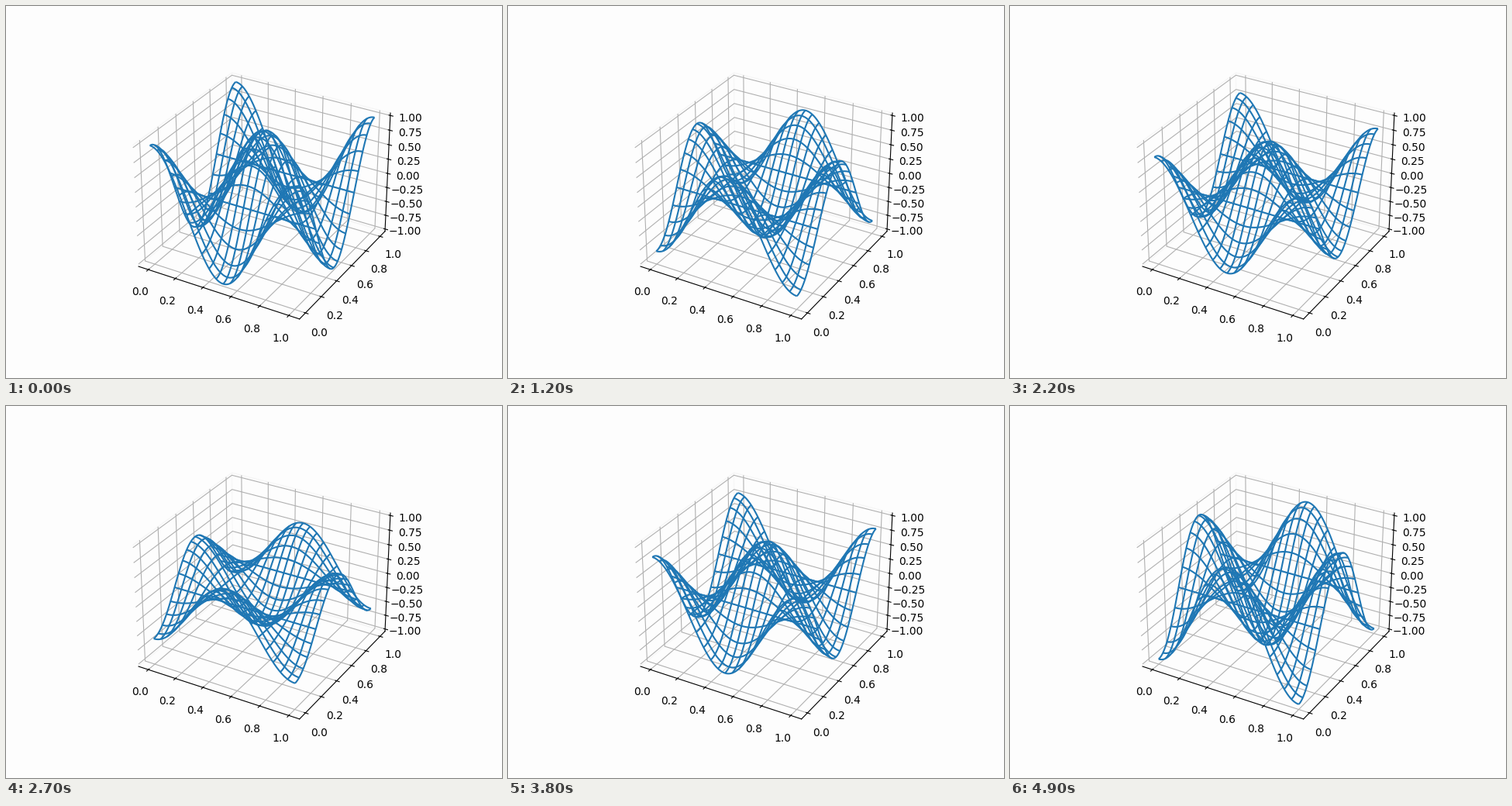
Write a matplotlib script that moves like this. It is 640 px wide and 480 px high and loops after 5 s.

```python
import numpy as np
import matplotlib.pyplot as plt
from matplotlib.animation import FuncAnimation

FRAMES, INTERVAL = 50, 100
BACKGROUND = "#fdfdfd"


def padded(low, high):
    """Widen limits so the end ticks sit a little inside the box."""
    pad = (high - low) / 48
    return low - pad, high + pad


fig = plt.figure(figsize=(6.4, 4.8), dpi=100, facecolor=BACKGROUND)
ax = fig.add_subplot(projection="3d", facecolor=BACKGROUND)
ax.set(xlim=padded(-0.05, 1.05), ylim=padded(-0.05, 1.05), zlim=padded(-1, 1))
for axis in (ax.xaxis, ax.yaxis, ax.zaxis):
    axis.pane.set_facecolor(BACKGROUND)
    axis.pane.set_edgecolor("#f0f0f0")

side = np.linspace(0, 1, 101)
x, y = np.meshgrid(side, side)
mode = np.cos(2 * np.pi * x) * np.cos(2 * np.pi * y)
wires = []


def update(frame):
    """Draw the standing wave, which swings once every two seconds."""
    while wires:
        wires.pop().remove()
    seconds = frame * INTERVAL / 1000
    wires.append(ax.plot_wireframe(x, y, mode * np.cos(np.pi * seconds),
                                   rstride=5, cstride=5))
    ax.set(xlim=padded(-0.05, 1.05), ylim=padded(-0.05, 1.05),
           zlim=padded(-1, 1))
    return wires


anim = FuncAnimation(fig, update, frames=FRAMES, interval=INTERVAL,
                     repeat=True, repeat_delay=0, blit=False)
plt.show()
```
